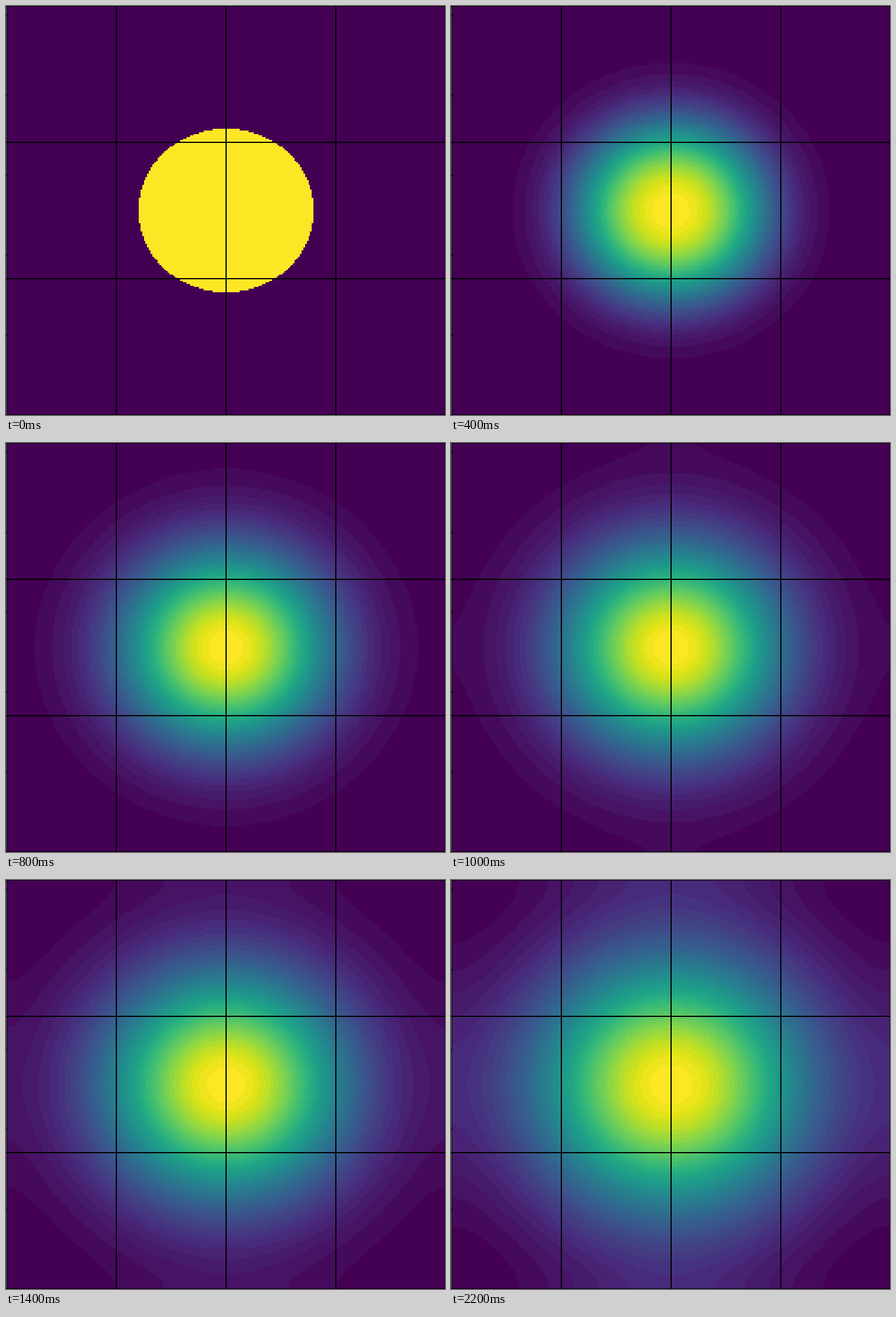
Animation of 744x693 px, one loop 2400 ms. Source, as an HTML page with a canvas:

```html
<!DOCTYPE html>
<html lang="en">
<head>
<meta charset="utf-8">
<title>Heat diffusion</title>
<style>
  html, body { margin: 0; width: 744px; height: 693px; overflow: hidden; background: #fff; }
  canvas { display: block; }
</style>
</head>
<body>
<canvas id="stage" width="744" height="693"></canvas>
<script>
const LOOP = 2400, STEP_MS = 200, LAST_STEP = 10;
const N = 256;            // cells per side
const RADIUS = 0.2;       // hot disc, as a fraction of the side
const VARIANCE = 0.0038;  // spread added by every step
const MODES = 14;
const BANDS = 42;

const viridis = ('440154 471365 482475 463480 414487 3b528b 355f8d 2f6c8e 2a788e 25848e 21918c ' +
  '1e9c89 22a884 2fb47c 44bf70 5ec962 7ad151 9bd93c bddf26 dfe318 fde725').split(' ')
  .map(hex => [0, 2, 4].map(i => parseInt(hex.slice(i, i + 2), 16)));

function colorAt(v) {
  const p = v * (viridis.length - 1), i = Math.min(Math.floor(p), viridis.length - 2);
  return viridis[i].map((c, k) => Math.round(c + (viridis[i + 1][k] - c) * (p - i)));
}
const palette = Array.from({ length: BANDS }, (_, k) => colorAt(k / (BANDS - 1)));

function besselJ1(x) {
  const n = 64;
  let sum = 0;
  for (let i = 0; i < n; i++) {
    const a = Math.PI * (i + 0.5) / n;
    sum += Math.cos(a - x * Math.sin(a));
  }
  return sum / n;
}

const offset = i => (i + 0.5) / N - 0.5;
const cosines = Array.from({ length: MODES }, (_, m) =>
  Float64Array.from({ length: N }, (_, i) => Math.cos(2 * Math.PI * m * offset(i))));

// Fourier coefficients of the disc
const disc = Array.from({ length: MODES }, (_, m) => Array.from({ length: MODES }, (_, n) => {
  const k = Math.hypot(m, n);
  const c = k ? RADIUS * besselJ1(2 * Math.PI * RADIUS * k) / k : Math.PI * RADIUS * RADIUS;
  return c * (m ? 2 : 1) * (n ? 2 : 1);
}));

function heat(step) {
  const field = new Float64Array(N * N);
  if (step === 0) {
    return field.map((_, p) => Math.hypot(offset(p % N), offset(Math.floor(p / N))) < RADIUS ? 1 : 0);
  }
  const decay = 2 * Math.PI ** 2 * VARIANCE * step;
  const damped = disc.map((row, m) => row.map((c, n) => c * Math.exp(-decay * (m * m + n * n))));
  for (let y = 0; y < N; y++) {
    const row = damped.map(cs => cs.reduce((sum, c, n) => sum + c * cosines[n][y], 0));
    for (let x = 0; x < N; x++) {
      let u = 0;
      for (let m = 0; m < MODES; m++) u += row[m] * cosines[m][x];
      field[y * N + x] = u;
    }
  }
  return field;
}

function heatMap(step) {
  const field = heat(step);
  let low = Infinity, high = -Infinity;
  for (const u of field) {
    low = Math.min(low, u);
    high = Math.max(high, u);
  }
  const map = document.createElement('canvas');
  map.width = map.height = N;
  const g = map.getContext('2d'), image = g.createImageData(N, N);
  field.forEach((u, p) => {
    const band = Math.min(BANDS - 1, Math.floor((u - low) / (high - low) * BANDS));
    image.data.set([...palette[band], 255], p * 4);
  });
  g.putImageData(image, 0, 0);
  return map;
}

const maps = Array.from({ length: LAST_STEP + 1 }, (_, step) => heatMap(step));
const ctx = document.getElementById('stage').getContext('2d');
ctx.imageSmoothingEnabled = false;

function draw(time) {
  const step = Math.min(LAST_STEP, Math.floor((time % LOOP) / STEP_MS));
  ctx.fillStyle = '#fff';
  ctx.fillRect(0, 0, 744, 693);
  ctx.drawImage(maps[step], 1, 0, 744, 693);

  ctx.fillStyle = '#000';
  for (let x = 187; x < 744; x += 186) ctx.fillRect(x - 1, 0, 2, 693);
  for (let y = 231; y < 693; y += 231) ctx.fillRect(0, y - 1, 744, 2);
  ctx.fillRect(0.4, 0, 1.6, 693);
  ctx.fillRect(743.5, 0, 0.5, 693);
  ctx.fillRect(0, 0, 744, 1);
  ctx.fillRect(0, 692, 744, 1);
  for (let v = 50; v < N; v += 50) ctx.fillRect(0, Math.round(693 * (1 - v / N)) - 1, 2, 2);
}

const start = performance.now();
function tick() {
  draw(performance.now() - start);
  requestAnimationFrame(tick);
}
tick();
</script>
</body>
</html>
```
